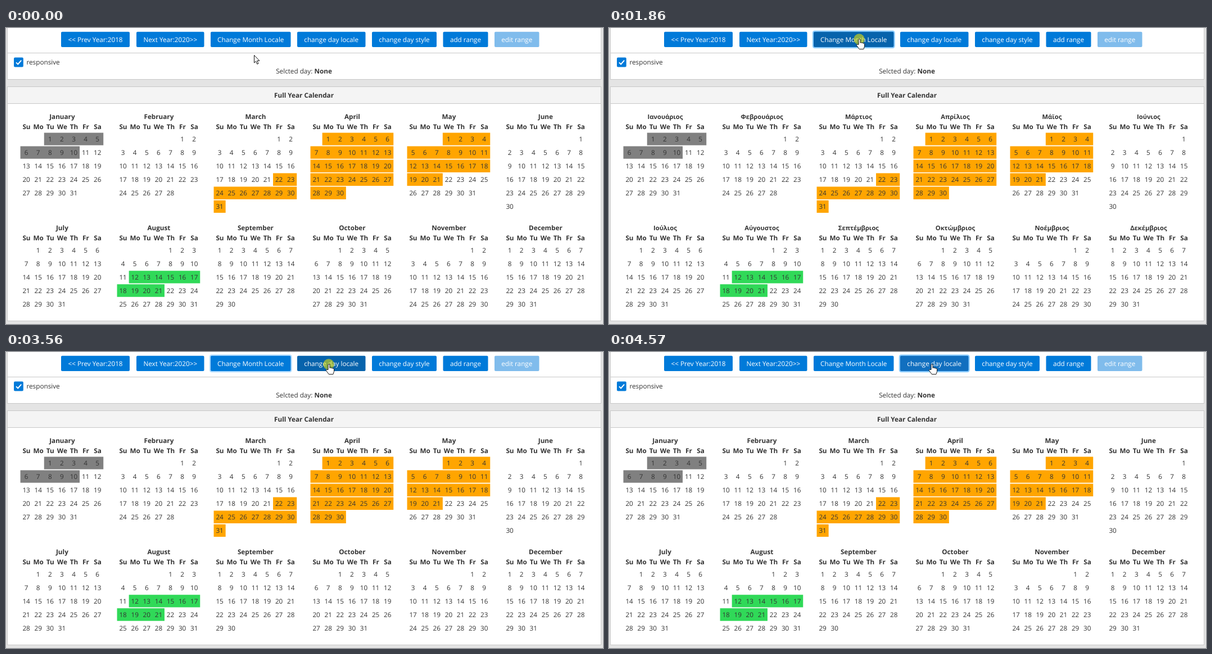
An HTML page for the animation above (5510 ms loop, 1062 px wide and 527 px high).

```html
<!DOCTYPE html>
<html lang="en">
<head>
<meta charset="utf-8">
<title>Full Year Calendar</title>
<style>
  html, body { margin: 0; width: 100%; height: 100%; overflow: hidden; background: #e4e4e4; }
  svg { display: block; width: 1062px; height: 527px; }
  text { font: 11.73px "Open Sans", sans-serif; fill: #333; text-rendering: geometricPrecision; }
  .mid { text-anchor: middle; }
  .bold { font-weight: 700; }
  .el .bold { font-size: 11.2px; }
  .btn { fill: #fff; }
  .panel { fill: #fff; stroke: #c8c8c8; }
  .cursor { fill: #fff; stroke: #111; stroke-linejoin: round; }
</style>
</head>
<body>
<svg id="stage" viewBox="0 0 1062 527">
  <rect class="panel" x="2.5" y="-4.5" width="1056" height="96"/>
  <path d="M3 44.5H1058" stroke="#c8c8c8"/>
  <rect class="panel" x="2.5" y="104.5" width="1056" height="417"/>
  <rect x="2.5" y="104.5" width="1056" height="30" fill="#f4f4f4" stroke="#c8c8c8"/>
  <rect x="14" y="52.6" width="16.8" height="16.8" rx="2" fill="#007ad9"/>
  <path d="M18 61.3l3.2 3.2 6-6.8" fill="none" stroke="#fff" stroke-width="1.9"/>
  <text x="36.5" y="65.3">responsive</text>
  <text class="mid" x="530" y="81">Selcted day: <tspan class="bold">None</tspan></text>
  <text class="mid bold" x="530" y="123.7">Full Year Calendar</text>
</svg>
<script>
const LOOP = 5510;
const TICK = 77.5, LEAD = 13; // the picture is held between ticks
const stage = document.getElementById('stage');

function add(tag, attrs, parent = stage, text = '') {
  const el = document.createElementNS('http://www.w3.org/2000/svg', tag);
  for (const k in attrs) el.setAttribute(k, attrs[k]);
  el.textContent = text;
  parent.appendChild(el);
  return el;
}

function label(text, x, y, cls = 'mid', parent = stage) {
  return add('text', { x, y, class: cls }, parent, text);
}

function button(text, left, right, fill = '#007ad9') {
  const box = { x: left, y: 6.7, width: right - left, height: 27.4, rx: 2 };
  const ring = add('rect', { ...box, fill: 'none', stroke: '#8dcdff', 'stroke-width': 4.4, opacity: 0 });
  const face = add('rect', { ...box, fill });
  label(text, (left + right) / 2, 24.8, 'mid btn');
  return { ring, face };
}

button('<< Prev Year:2018', 98, 220);
button('Next Year:2020>>', 232, 352.5);
const monthBtn = button('Change Month Locale', 364, 506.5);
const dayBtn = button('change day locale', 518, 639.5);
button('change day style', 651, 766);
button('add range', 777.5, 857.5);
button('edit range', 869, 948.5, '#80bcec');

const months = {
  en: 'January February March April May June July August September October November December',
  el: 'Ιανουάριος Φεβρουάριος Μάρτιος Απρίλιος Μάϊος Ιούνιος Ιούλιος Αύγουστος Σεπτέμβριος Οκτώμβριος Νοέμβριος Δεκέμβριος'
};
const days = { en: 'Su Mo Tu We Th Fr Sa', el: 'Κυ Δε Τρ Τε Πε Πα Σα' };
const pitch = { en: 21.1, el: 20.8 };

// first and last date as month * 100 + day
const ranges = [[101, 110, '#808080'], [322, 521, '#ffa500'], [812, 821, '#30d958']];

const centerX = m => 99.4 + 172 * (m % 6);
const topY = m => (m < 6 ? 0 : 197.7);

function titles(lang) {
  const g = add('g', { class: lang });
  months[lang].split(' ').forEach((name, m) => label(name, centerX(m) + .5, 162 + topY(m), 'mid bold', g));
  return g;
}

function grid(lang) {
  const g = add('g', { class: lang }), step = pitch[lang];
  for (let m = 0; m < 12; m++) {
    const colX = c => centerX(m) + (c - 3) * step;
    days[lang].split(' ').forEach((name, c) => label(name, colX(c) + .4, 180.2 + topY(m), 'mid bold', g));
    const first = new Date(2019, m, 1).getDay();
    const count = new Date(2019, m + 1, 0).getDate();
    const place = d => {
      const i = first + d - 1;
      return [colX(i % 7), 197.6 + topY(m) + 24.05 * Math.floor(i / 7)];
    };
    for (const [from, to, fill] of ranges) {
      let d = '';
      for (let n = 1; n <= count; n++) {
        const key = (m + 1) * 100 + n, [x, y] = place(n);
        if (key >= from && key <= to) d += `M${x - step / 2} ${y}h${step}`;
      }
      add('path', { d, stroke: fill, 'stroke-width': 22.4 }, g);
    }
    for (let n = 1; n <= count; n++) {
      const [x, y] = place(n);
      label(n, x, y + 4.4, 'mid', g);
    }
  }
  return g;
}

const titleSet = { en: titles('en'), el: titles('el') };
const gridSet = { en: grid('en'), el: grid('el') };

const spot = add('circle', { r: 9.7, fill: '#dcdc10', 'fill-opacity': .62 });
const arrow = add('path', { class: 'cursor', d: 'M.5 .5V14l3-2.8 2.3 5.1 2.2-1-2.3-5h4.2z' });
const hand = add('path', {
  class: 'cursor',
  d: 'M-1 9.5V1.1a1.5 1.5 0 0 1 3 0V6.5a1.5 1.5 0 0 1 2.8.4 1.5 1.5 0 0 1 2.6.6 1.4 1.4 0 0 1 2.2 1V12.5L7.9 17.7H.3L-4.2 11.5a1.4 1.4 0 0 1 2-2z'
});

// Press times in ticks: each shows the spot for two ticks and switches the language after one.
const monthClicks = [11, 24], dayClicks = [46, 57];

const ramp = (n, from, to) => Math.min(1, Math.max(0, (n - from) / (to - from)));
const easeOut = p => 1 - (1 - p) ** 2.3;
const pressed = (clicks, n) => clicks.some(c => n >= c && n < c + 2);
const lang = (clicks, n) => (n > clicks[0] && n <= clicks[1] ? 'el' : 'en');

function pointer(n) {
  const rise = easeOut(ramp(n, 5, 10)), p = ramp(n, 29, 39);
  return [441 + 4 * rise + 129 * easeOut(p), 48 - 28 * rise + 2 * p + 11 * Math.sin(Math.PI * p)];
}

// 0 normal, 1 hover, 2 pressed
const tones = [[0, 122, 217], [17, 111, 191], [0, 91, 159]];
function tone(k) {
  const i = Math.min(1, Math.floor(k));
  return `rgb(${tones[i].map((v, c) => Math.round(v + (tones[i + 1][c] - v) * (k - i)))})`;
}

const show = (el, on) => el.setAttribute('visibility', on ? 'visible' : 'hidden');

function paint(btn, hover, press, ring) {
  btn.face.setAttribute('fill', tone(hover + (press ? .6 : 0)));
  btn.ring.setAttribute('opacity', ring);
}

function draw(n) {
  const [x, y] = pointer(n);
  const over = y < 34 && (x < 506 || x > 518);
  const monthPress = pressed(monthClicks, n), dayPress = pressed(dayClicks, n);
  show(hand, over);
  show(arrow, !over);
  show(spot, monthPress || dayPress);
  for (const el of [hand, arrow, spot]) el.setAttribute('transform', `translate(${x} ${y})`);
  for (const l of ['en', 'el']) {
    show(titleSet[l], lang(monthClicks, n) === l);
    show(gridSet[l], lang(dayClicks, n) === l);
  }
  paint(monthBtn, ramp(n, 7, 10) - ramp(n, 31, 34), monthPress, ramp(n, 11, 14) - ramp(n, 45, 48));
  paint(dayBtn, ramp(n, 34, 37), dayPress, ramp(n, 46, 48));
}

const start = performance.now();
function frame() {
  const t = (performance.now() - start) % LOOP;
  draw(Math.floor((t + LEAD) / TICK));
  requestAnimationFrame(frame);
}
frame();
</script>
</body>
</html>
```
